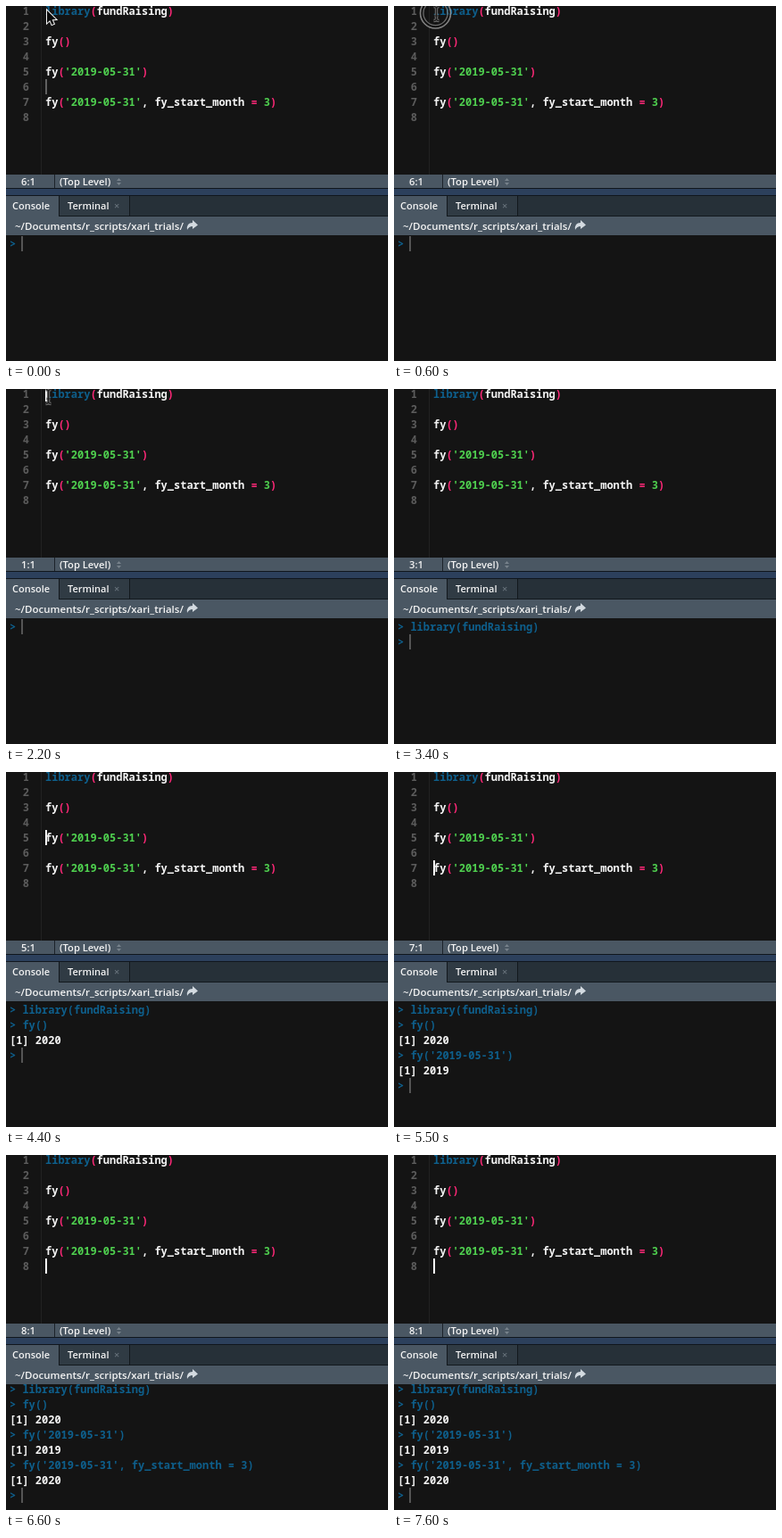
An HTML page with a canvas that plays this animation: 428 px wide and 398 px high, repeating every 8100 ms.

```html
<!DOCTYPE html>
<html lang="en">
<head>
<meta charset="utf-8">
<title>R console session</title>
<style>
html, body { margin: 0; width: 100%; height: 100%; overflow: hidden; background: #141414; }
canvas { display: block; }
</style>
</head>
<body>
<canvas id="stage" width="428" height="398"></canvas>
<script>
const ctx = document.getElementById('stage').getContext('2d');
const LOOP = 8100, ROW = 17, CHAR = 7.2;
const MONO = '600 12px "Noto Sans Mono", "DejaVu Sans Mono", monospace';
const ui = size => `600 ${size}px "Open Sans", "Noto Sans", sans-serif`;
const WHITE = '#f4f4f4', BLUE = '#0e5f8c', PINK = '#ff2878', GREEN = '#4fd04f', GREY = '#5c5c5c';
const BAR = '#4a5763';

// Each code row is a list of [text, colour] pieces.
const date = ["'2019-05-31'", GREEN];
const code = [
  [['library', BLUE], ['(', PINK], ['fundRaising', WHITE], [')', PINK]],
  [],
  [['fy', WHITE], ['()', PINK]],
  [],
  [['fy', WHITE], ['(', PINK], date, [')', PINK]],
  [],
  [['fy', WHITE], ['(', PINK], date, [', fy_start_month ', WHITE], ['= ', PINK], ['3', GREEN], [')', PINK]],
  []
];

// [time, console row]
const output = [
  [2900, '> library(fundRaising)'],
  [4300, '> fy()'],
  [4400, '[1] 2020'],
  [5500, "> fy('2019-05-31')"],
  [5500, '[1] 2019'],
  [6500, "> fy('2019-05-31', fy_start_month = 3)"],
  [6600, '[1] 2020']
];

// [time, value]; the latest entry that has begun applies.
const status = [[0, '6:1'], [700, '1:1'], [2900, '3:1'], [4300, '5:1'], [5500, '7:1'], [6500, '8:1']];
const caret = [[0, 6], [300, 0], [700, 1], [900, 0], [1300, 1], [1800, 0], [2200, 1], [2800, 0],
  [3000, 3], [3400, 0], [3800, 3], [4400, 5], [4900, 0], [5300, 5], [5500, 7], [6100, 0],
  [6500, 7], [6600, 8], [7200, 0], [7600, 8]];
const at = (track, t) => track.filter(e => e[0] <= t).pop()[1];
const clamp = v => Math.max(0, Math.min(1, v));

function box(x, y, w, h, color) {
  ctx.fillStyle = color;
  ctx.fillRect(x, y, w, h);
}

function text(str, x, y, color, font = MONO) {
  ctx.font = font;
  ctx.fillStyle = color;
  ctx.fillText(str, x, y);
}

function poly(points, fill, stroke) {
  ctx.beginPath();
  points.forEach(([x, y]) => ctx.lineTo(x, y));
  ctx.closePath();
  if (stroke) {
    ctx.strokeStyle = stroke;
    ctx.lineWidth = 2;
    ctx.stroke();
  }
  ctx.fillStyle = fill;
  ctx.fill();
}

function drawEditor(t) {
  box(0, 0, 428, 189, '#141414');
  box(39, 0, 1, 189, '#222222');
  code.forEach((row, i) => {
    const y = 10 + i * ROW;
    text(String(i + 1), 18.8, y, GREY);
    let x = 44;
    for (const [str, color] of row) {
      text(str, x, y, color);
      x += str.length * CHAR;
    }
  });
  const line = at(caret, t);
  if (line) box(44, line * ROW - 20, 2, 17, t < 300 ? '#606060' : '#ffffff');
}

function drawBars(t) {
  box(0, 189, 428, 15, BAR);
  box(54, 189, 1, 15, '#1c232a');
  text(at(status, t), 17, 201, WHITE, ui(11.2));
  text('(Top Level)', 60, 201, WHITE, ui(11.2));
  poly([[124, 196], [126.5, 193], [129, 196]], '#78838c');
  poly([[124, 198], [126.5, 201], [129, 198]], '#78838c');

  box(0, 204, 428, 1, '#10161d');
  box(0, 205, 428, 7, '#2c405c');
  box(0, 212, 428, 1, '#10161d');
  box(0, 213, 428, 23, '#263038');
  box(60, 213, 78, 22, '#303b44');
  box(59, 213, 1, 22, '#12181d');
  box(138, 213, 1, 22, '#12181d');
  box(59, 235, 369, 1, '#12181d');
  box(0, 213, 59, 24, BAR);
  text('Console', 7, 228, WHITE, ui(11));
  text('Terminal', 69, 228, WHITE, ui(11));
  text('×', 121, 228, '#66717a', ui(11));

  box(0, 236, 428, 21, BAR);
  text('~/Documents/r_scripts/xari_trials/', 10, 251, WHITE, ui(11.5));
  ctx.beginPath();
  ctx.moveTo(203, 251);
  ctx.quadraticCurveTo(202, 243, 209, 243);
  ctx.lineTo(209, 240);
  ctx.lineTo(215, 245.5);
  ctx.lineTo(209, 250);
  ctx.lineTo(209, 247);
  ctx.quadraticCurveTo(205, 247, 203, 251);
  ctx.fillStyle = '#d3dae0';
  ctx.fill();
}

function drawConsole(t) {
  ctx.save();
  ctx.beginPath();
  ctx.rect(0, 257, 428, 141);
  ctx.clip();
  const shift = t >= 6600 ? 4 : 0;
  const rows = output.filter(e => e[0] <= t);
  rows.forEach(([, str], i) =>
    text(str, 4, 271 + i * ROW - shift, str[0] === '>' ? BLUE : WHITE));
  // The prompt returns one step after a command is echoed.
  const busy = [2900, 4300, 6500].some(s => t >= s && t < s + 100);
  const y = 271 + rows.length * ROW - shift;
  if (!busy) text('>', 4, y, BLUE);
  box(busy ? 4 : 17, y - 13, 2, 17, '#555555');
  ctx.restore();
}

function drawArrow(x, y) {
  const shape = [[0, 0], [0, 14], [3.2, 11], [5.4, 16], [7.8, 15], [5.6, 10.2], [10, 10]];
  poly(shape.map(([dx, dy]) => [x + dx, y + dy]), '#0a0a0a', '#f2f2f2');
}

function drawBeam(x, y) {
  ctx.beginPath();
  ctx.moveTo(x - 3, y - 7.5);
  ctx.quadraticCurveTo(x, y - 7.5, x, y - 5);
  ctx.lineTo(x, y + 6);
  ctx.quadraticCurveTo(x, y + 8.5, x - 3, y + 8.5);
  ctx.moveTo(x + 3, y - 7.5);
  ctx.quadraticCurveTo(x, y - 7.5, x, y - 5);
  ctx.moveTo(x, y + 6);
  ctx.quadraticCurveTo(x, y + 8.5, x + 3, y + 8.5);
  ctx.moveTo(x - 2, y + 3);
  ctx.lineTo(x + 2, y + 3);
  for (const [width, color] of [[3.4, '#6a6a6a'], [1.2, '#1c1c1c']]) {
    ctx.lineWidth = width;
    ctx.strokeStyle = color;
    ctx.stroke();
  }
}

function drawRing(alpha) {
  ctx.save();
  ctx.globalAlpha = alpha;
  for (const [r, width, color] of [[15.5, 4, '#0c0c0c'], [17, 1.6, '#f2f2f2'], [13.6, 1.3, '#c8c8c8']]) {
    ctx.beginPath();
    ctx.arc(46.5, 8, r, 0, Math.PI * 2);
    ctx.lineWidth = width;
    ctx.strokeStyle = color;
    ctx.stroke();
  }
  ctx.restore();
}

function drawMouse(t) {
  if (t >= 2800) return;
  if (t < 400) drawArrow(46, 5 - clamp((t - 100) / 200));
  else drawBeam(47.5, 8);
  const ring = Math.min(clamp((t - 500) / 200), clamp((1300 - t) / 200));
  if (ring > 0) drawRing(ring);
}

function draw(now) {
  const t = Math.floor((now % LOOP) / 100) * 100;
  box(0, 0, 428, 398, '#141414');
  drawEditor(t);
  drawBars(t);
  drawConsole(t);
  drawMouse(t);
}

const start = performance.now();
function frame() {
  draw(performance.now() - start);
  requestAnimationFrame(frame);
}
frame();
</script>
</body>
</html>
```
